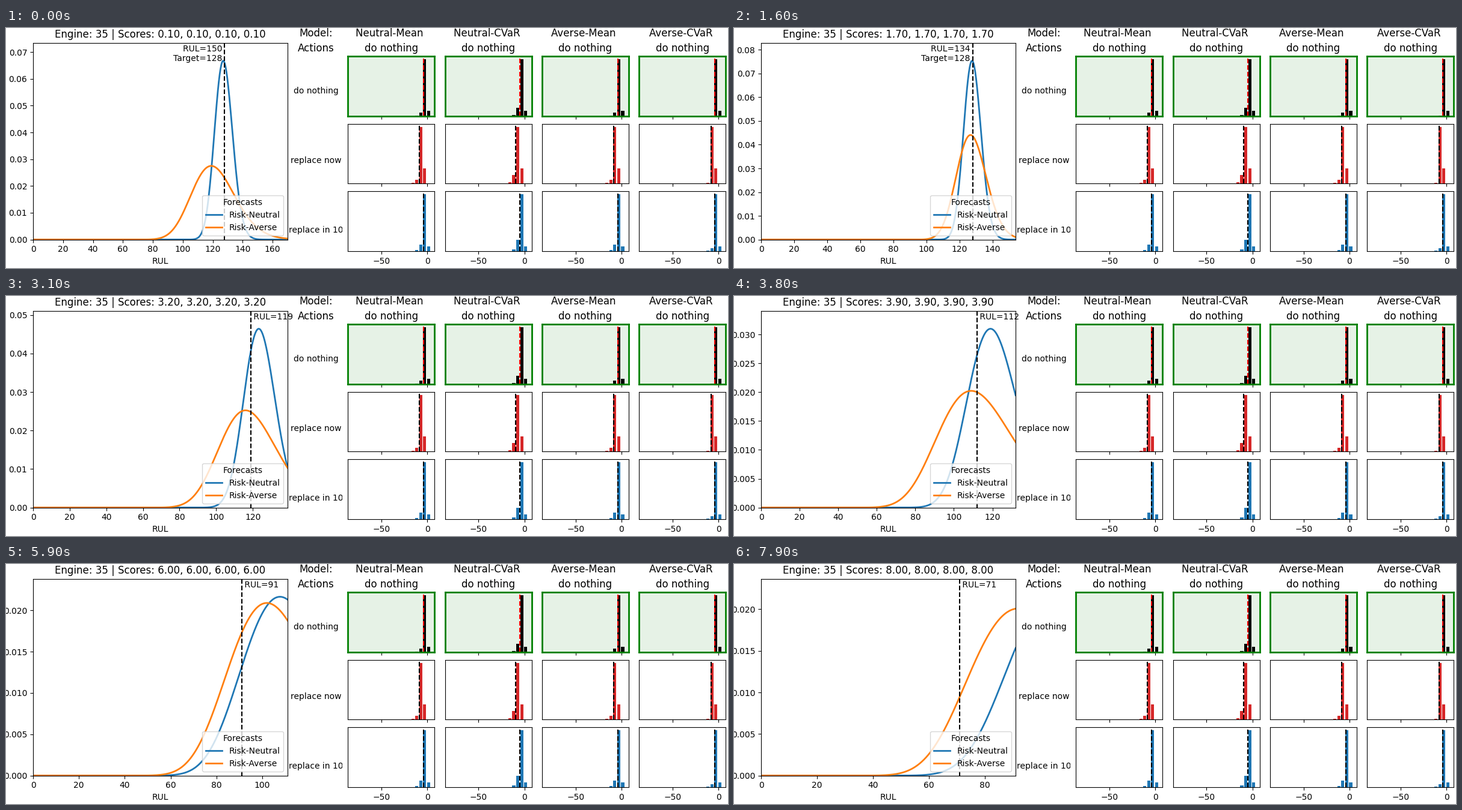
Write a matplotlib script that moves like this. It is 1200x400 px and loops after 8 s.

```python
import numpy as np
import matplotlib.pyplot as plt
from matplotlib.animation import FuncAnimation
from matplotlib.transforms import Bbox

W, H = 1200, 400
FRAMES, INTERVAL = 80, 100
TARGET = 128

plt.rcParams["font.family"] = "DejaVu Sans"
plt.rcParams["font.size"] = 10
fig = plt.figure(figsize=(W / 100, H / 100), dpi=100, facecolor="white")


def axes_px(left, top, width, height):
    """Add axes given in pixels from the top left corner."""
    return fig.add_axes([left / W, 1 - (top + height) / H, width / W, height / H])


def text_px(x, y, s, **kw):
    return fig.text(x / W, 1 - y / H, s, ha="center", **kw)


def clip_right(text, x):
    text.set_clip_box(Bbox.from_extents(0, 0, x, H))
    text.set_clip_on(True)


# Forecast panel: log-normal densities, their mode and spread eased between keys
KEYS = [0, 9, 24, 38, 49, 68, 79]
NEUTRAL = ([127, 127.8, 127.5, 119, 129, 88.5, 105],
           [.047, .05, .0316, .1075, .0385, .286, .174])
AVERSE = ([119, 130, 123, 109, 128.5, 78, 92],
          [.121, .053, .092, .178, .05, .305, .211])


def density(params, i, x):
    mode, spread = (np.interp(i, KEYS, p) for p in params)
    peak = np.exp(-spread**2 / 2) / (mode * spread * np.sqrt(2 * np.pi))
    return peak * np.exp(-(np.log(x / mode) / spread)**2 / 2), peak


main = axes_px(45, 24.8, 423, 327.8)
main.set_xlabel("RUL")
title = main.set_title("")
neutral, = main.plot([], [], lw=2, color="tab:blue", label="Risk-Neutral")
averse, = main.plot([], [], lw=2, color="tab:orange", label="Risk-Averse")
marker = main.axvline(TARGET, color="black", ls="--", lw=1.5)
note = main.text(0, 0, "", va="top")
clip_right(note, 476)
main.legend(title="Forecasts", loc="lower right")
text_px(515.3, 39.2, "Model:\nActions", fontsize=12, va="baseline", linespacing=1.5)

# Outcome histograms: a main bar of 100, a right neighbour and a fading left tail
BIN, LAST_EDGE = 4.29, 3.5
MODELS = [("Neutral-Mean", 6.5, -4.3), ("Neutral-CVaR", 15, -5.3),
          ("Averse-Mean", 6.5, -4), ("Averse-CVaR", 1, -3.9)]
# name, shift in bins, right neighbour, extra left tail, colour
ACTIONS = [("do nothing", 0, 9.5, 0, "black"),
           ("replace now", 1, 27, 0, "tab:red"),
           ("replace in 10", 0, 8.5, 4.5, "tab:blue")]


def mark_chosen(ax, model):
    ax.set_title(model + " \ndo nothing", linespacing=1.5)
    ax.set_facecolor((.9, .95, .9))
    for spine in ax.spines.values():
        spine.set(color="green", linewidth=2)


for row, (action, shift, right, extra, color) in enumerate(ACTIONS):
    clip_right(text_px(515.2, 104.5 + 116 * row, action, va="center"), 559)
    for col, (model, tail, mean) in enumerate(MODELS):
        ax = axes_px(568.2 + 161.3 * col, 47.5 + 112.4 * row, 144, 99.5)
        left = tail + extra
        heights = [right, 100, left, left / 6]
        centers = LAST_EDGE - BIN * (np.arange(4) + shift + .5)
        ax.bar(centers, heights, width=.8 * BIN, color=color)
        ax.axvline(mean - shift * BIN, color="black" if row else "red", ls="--", lw=1.5)
        ax.set(xlim=(-86.6, 7.8), ylim=(0, 105), xticks=[-50, 0], yticks=[])
        ax.tick_params(labelbottom=row == 2)
        if row == 0:
            mark_chosen(ax, model)


def update(i):
    rul = 150 - i
    goal = min(rul, TARGET)
    x = np.linspace(.01, rul + 20, 600)
    peaks = []
    for line, params in ((neutral, NEUTRAL), (averse, AVERSE)):
        y, peak = density(params, i, x)
        line.set_data(x, y)
        peaks.append(peak)
    top = 1.1 * max(peaks)
    main.set_xlim(0, rul + 20)
    main.set_ylim(0, top)
    marker.set_xdata([goal, goal])
    note.set_position((goal, .99 * top))
    if rul > TARGET:
        note.set(text=f"RUL={rul} \nTarget={TARGET} ", ha="right")
    else:
        note.set(text=f" RUL={rul}", ha="left")
    score = f"{(i + 1) / 10:.2f}"
    title.set_text("Engine: 35 | Scores: " + ", ".join([score] * 4))
    return neutral, averse, marker, note, title


anim = FuncAnimation(fig, update, frames=FRAMES, interval=INTERVAL, repeat=True)
plt.show()
```
